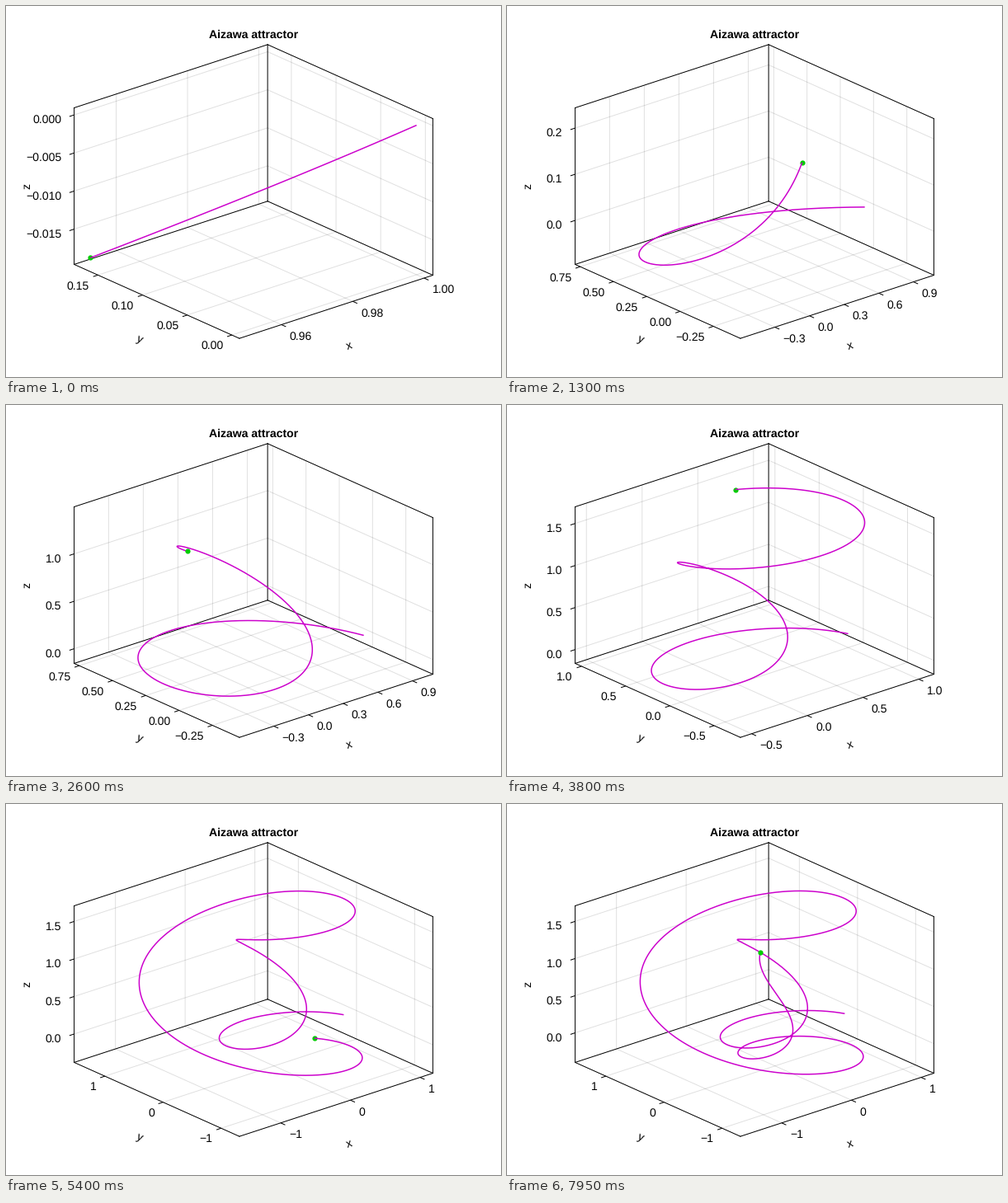
Recreate the animation shown at these times as a matplotlib script. Size 600 px wide and 450 px high, loop 8000 ms.

```python
import math

import numpy as np
import matplotlib.pyplot as plt
from matplotlib.animation import FuncAnimation
from matplotlib.collections import LineCollection

W, H, DPI = 600, 450, 100
FRAMES, INTERVAL = 160, 50
DT, STEPS = 0.001, 50  # Euler step, steps per frame
PX = 72 / DPI  # points per pixel

plt.rcParams["font.family"] = ["Liberation Sans", "DejaVu Sans"]
plt.rcParams["text.hinting"] = "no_hinting"


# ---------- trajectory ----------
def aizawa(x, y, z, a=0.95, b=0.7, c=0.6, d=3.5, e=0.25, f=0.1):
    return ((z - b) * x - d * y,
            d * x + (z - b) * y,
            c + a * z - z**3 / 3 - (x * x + y * y) * (1 + e * z)
            + f * z * x**3)


def trajectory(n):
    p = (1.0, 0.0, 0.0)
    points = [p]
    for _ in range(n):
        p = tuple(u + DT * v for u, v in zip(p, aizawa(*p)))
        points.append(p)
    return np.array(points)


PATH = trajectory(FRAMES * STEPS)

# ---------- orthographic camera on the unit box ----------
AZ, EL = 1.275 * math.pi, math.pi / 8
SCALE, CENTER = 308.4, np.array([300.0, 225.0])
ASPECT = np.array([1, 1, 2 / 3])
RIGHT = np.array([-math.sin(AZ), math.cos(AZ), 0])
UP = np.array([-math.sin(EL) * math.cos(AZ),
               -math.sin(EL) * math.sin(AZ), math.cos(EL)])
TO_EYE = np.array([math.cos(EL) * math.cos(AZ),
                   math.cos(EL) * math.sin(AZ), math.sin(EL)])


def project(p):
    q = (np.asarray(p, float) - 0.5) * ASPECT
    return CENTER + SCALE * np.stack([q @ RIGHT, -(q @ UP)], axis=-1)


def unit(v):
    return v / np.hypot(*v)


FRONT = project([0, 0, 0])
OUT_X = unit(FRONT - project([1, 0, 0]))  # screen direction of -x
OUT_Y = unit(FRONT - project([0, 1, 0]))  # screen direction of -y

# ---------- Wilkinson-style ticks, wide steps first ----------
NICE = [(5, 0.9), (3, 0.2), (2.5, 0.5), (2, 0.7), (1, 1.0)]


def find_ticks(lo, hi, ideal=5, k_min=3, k_max=10):
    span = hi - lo
    best, best_score, digits = [], -math.inf, 0
    top = math.ceil(math.log10(span))
    for z in range(top, top - 4, -1):
        for q, nice in NICE:
            step = q * 10.0**z
            first, last = math.ceil(lo / step), math.floor(hi / step)
            n = last - first + 1
            if not k_min <= n <= k_max:
                continue
            # zero counts if a tick run covering the range can reach it
            low = min(0, math.floor(lo / step))
            high = max(0, math.ceil(hi / step))
            run = high - low
            zero = run * step < 2 * span and run < 2 * k_max
            score = ((1 - abs(n - ideal) / ideal) / 4 + zero / 6
                     + 1.5 * span / ((n - 1) * step) / 3 + nice / 4)
            if score > best_score + 1e-9:
                best_score = score
                best = [k * step for k in range(first, last + 1)]
                digits = max(0, -z + (q == 2.5))
    return best, digits


def label(v, digits):
    s = f"{abs(v):.{digits}f}"
    return "\u2212" + s if v < 0 and float(s) else s


# ---------- stage ----------
fig = plt.figure(figsize=(W / DPI, H / DPI), dpi=DPI, facecolor="white")
ax = fig.add_axes([0, 0, 1, 1])
ax.set_xlim(0, W)
ax.set_ylim(H, 0)
ax.axis("off")


def put_text(x, y, s="", **kw):
    return ax.text(x, y, s, fontsize=14 * PX, color="black",
                   va="baseline", rotation_mode="anchor", **kw)


grid = LineCollection([], colors=[(0, 0, 0, 0.12)], linewidths=PX, zorder=1)
marks = LineCollection([], colors="black", linewidths=PX, zorder=2)
ax.add_collection(grid)
ax.add_collection(marks)

EDGES = [
    ((0, 0, 0), (1, 0, 0)), ((0, 0, 0), (0, 1, 0)),
    ((0, 1, 0), (1, 1, 0)), ((1, 0, 0), (1, 1, 0)),
    ((0, 1, 1), (1, 1, 1)), ((1, 0, 1), (1, 1, 1)),
    ((0, 1, 0), (0, 1, 1)), ((1, 1, 0), (1, 1, 1)), ((1, 0, 0), (1, 0, 1)),
]
for edge in EDGES:
    ax.plot(*project(edge).T, color="black", lw=PX, zorder=2, snap=False,
            solid_capstyle="projecting")

put_text(300, 39, "Aizawa attractor", ha="center", weight="bold")

BASELINE = 13.8  # from the top of a text box to its baseline
for name, mid, along in [("x", (0.5, 0, 0), -OUT_X),
                         ("y", (0, 0.5, 0), OUT_Y)]:
    normal = np.array([-along[1], along[0]])
    pos = project(mid) + (40 + BASELINE) * normal
    angle = -math.degrees(math.atan2(along[1], along[0]))
    put_text(*pos, name, ha="center", rotation=angle)
z_mid = project([0, 1, 0.5])
put_text(z_mid[0] - 53.3, z_mid[1], "z", ha="center", rotation=90)

# per axis: tick direction, label distance, alignment, baseline drop
AXES = [(OUT_Y, 11, "left", BASELINE),
        (OUT_X, 11, "right", BASELINE),
        (OUT_X, 16, "right", 5.0)]
labels = [[put_text(0, 0, ha=align) for _ in range(10)]
          for _, _, align, _ in AXES]

curve, = ax.plot([], [], color="#cc00cc", lw=1.5 * PX, zorder=5,
                 solid_joinstyle="round", solid_capstyle="butt")
head, = ax.plot([], [], "o", color="#00cc00", ms=6.2 * PX, mew=0, zorder=6,
                snap=False)


def grid_line(dim, f):
    if dim == 0:
        return [(f, 0, 0), (f, 1, 0), (f, 1, 1)]
    if dim == 1:
        return [(0, f, 0), (1, f, 0), (1, f, 1)]
    return [(0, 1, f), (1, 1, f), (1, 0, f)]


def tick_base(dim, f):
    return project([(f, 0, 0), (0, f, 0), (0, 1, f)][dim])


def update(i):
    pts = PATH[:(i + 1) * STEPS + 1]
    lo, hi = pts.min(axis=0), pts.max(axis=0)
    pad = 0.05 * (hi - lo)
    lo, hi = lo - pad, hi + pad

    grid_segs, mark_segs = [], []
    for dim, (out, dist, _, drop) in enumerate(AXES):
        values, digits = find_ticks(lo[dim], hi[dim])
        for t in labels[dim]:
            t.set_visible(False)
        for t, v in zip(labels[dim], values):
            f = (v - lo[dim]) / (hi[dim] - lo[dim])
            base = tick_base(dim, f)
            grid_segs.append(project(grid_line(dim, f)))
            mark_segs.append([base, base + 6 * out])
            x, y = base + dist * out
            t.set_position((x, y + drop))
            t.set_text(label(v, digits))
            t.set_visible(True)
    grid.set_segments(grid_segs)
    marks.set_segments(mark_segs)

    box = (pts - lo) / (hi - lo)
    screen = project(box)
    curve.set_data(screen[:, 0], screen[:, 1])
    head.set_data(screen[-1:, 0], screen[-1:, 1])
    # the curve covers the dot when it arrives from nearer the eye
    approach = ((box[-1] - box[-2]) * ASPECT) @ TO_EYE
    head.set_zorder(6 if approach > 0 else 4)
    return curve, head


anim = FuncAnimation(fig, update, frames=FRAMES, interval=INTERVAL,
                     repeat=True, repeat_delay=0, blit=False)
plt.show()
```
